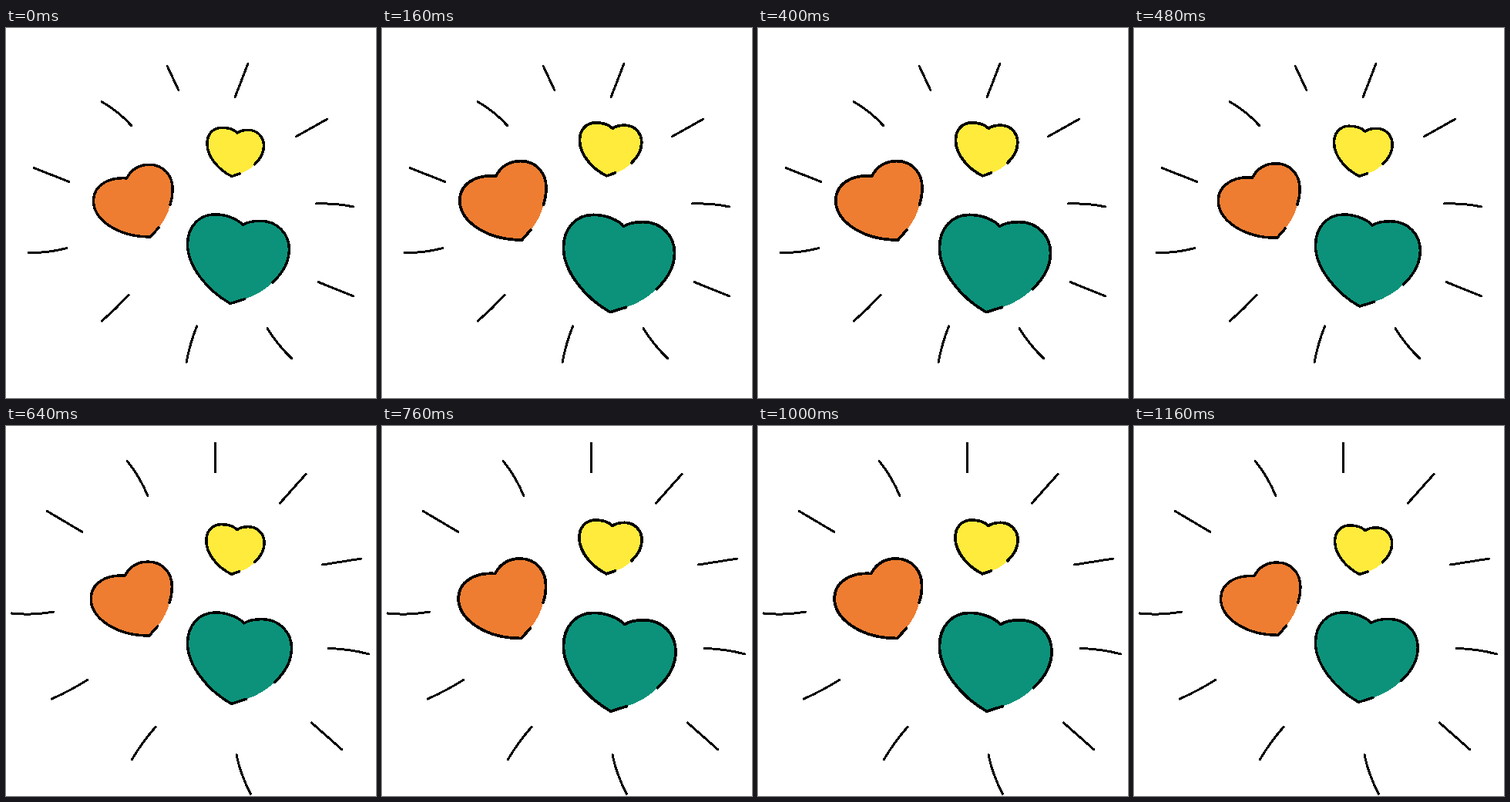
These frames come from a looping animation (480 px wide and 480 px high, 1.2 s). An HTML page:

```html
<!DOCTYPE html>
<html lang="en">
<head>
<meta charset="utf-8">
<title>Beating hearts</title>
<style>
  html, body { margin: 0; width: 100%; height: 100%; overflow: hidden; background: #fff; }
  svg { display: block; width: 100%; height: 100%; shape-rendering: crispEdges; }
  path { fill: none; stroke: #000; stroke-linecap: round; stroke-linejoin: round; }
  .rays { stroke-width: 3; }
  .line { stroke-width: 3.4; }
</style>
</head>
<body>
<svg id="stage" viewBox="0 0 480 480"></svg>
<script>
const STEP = 40, STEPS = 30;
const RAY_HOLD = 5;
const BEATS = [0, 7, 14, 22, 30]; // small, large, small, large, small
const GROWTH = 0.152;

// Each outline is open; "gap" closes the fill along the unstroked edge.
const HEARTS = [
  {
    color: '#ffeb3b', anchor: [309.5, 199],
    line: 'M303 189 L293 192.5 C275.5 184 261.3 167 261 151 C260.5 138 268.5 129.3 280 129.3 ' +
          'C288 129.3 296 132 300 136 C304 133.3 309 132.3 314 132.3 ' +
          'C326 132.3 334.5 141 334.5 153 C334.5 162 330 170 322.5 177',
    gap: 'C317 183 310 187 303 189'
  },
  {
    color: '#ee7d31', anchor: [251, 228],
    line: 'M198 259 L187.5 271 C169 271 149 266.5 134 256.5 C120 247 113 236 113.5 223 ' +
          'C114 205 132 193 156.5 195 C162 184.5 171 177.3 186 177.3 ' +
          'C204 177.3 216.2 191 216.2 209 C216.2 216 215 223 213 229',
    gap: 'C211 239 206 249 198 259'
  },
  {
    color: '#0c927a', anchor: [236, 236],
    line: 'M309.5 351.7 L291 357.5 C261 340.5 235.5 309 235.5 281 C235.5 257 251 241.8 271 241.8 ' +
          'C287 241.8 302 249 307 255.5 C314 251 321 250.3 330 250.3 ' +
          'C352 250.3 367.4 267 367.4 287 C367.4 303 360 317 346 330',
    gap: 'C336 340 322 348 309.5 351.7'
  }
];

const RAYS = [
  'M209 49L224 81 M314 46L297 90 M124 95.5Q146 108 163 127 M36 181.5L82 199.5 ' +
  'M417 118L376 141 M402 228Q427 227 451 232 M29 291.5Q55 292 79 285.5 ' +
  'M405 329.5L451 348 M159 346.5Q143 364 124.5 380 M247.5 387Q239 408 234 433.5 ' +
  'M339 389.5Q352 411 371 429',
  'M271.5 22V60 M157 45Q174 66 184 91 M389 62.5L355.5 100 M53.5 110.5L99 137.5 ' +
  'M410.5 180L461 172 M7.5 243Q33 246 62 241 M418 288.5Q445 289 471 296 ' +
  'M59.5 354Q84 343 105.5 329.5 M194 390.5Q176 411 163.5 432.5 ' +
  'M396.5 385L436 420 M299 426.5Q304 452 317.5 477.5'
];

const stage = document.getElementById('stage');

function add(parent, tag, attrs = {}) {
  const node = document.createElementNS('http://www.w3.org/2000/svg', tag);
  for (const key in attrs) node.setAttribute(key, attrs[key]);
  return parent.appendChild(node);
}

const rays = add(stage, 'path', { class: 'rays' });

for (const heart of HEARTS) {
  heart.group = add(stage, 'g');
  add(heart.group, 'path', { d: heart.line + heart.gap + 'Z', style: `fill:${heart.color};stroke:none` });
  add(heart.group, 'path', { d: heart.line, class: 'line' });
}

const smooth = p => p * p * (3 - 2 * p);

function beat(step) {
  const i = BEATS.findIndex((start, k) => step < BEATS[k + 1]);
  const p = smooth((step - BEATS[i]) / (BEATS[i + 1] - BEATS[i]));
  return i % 2 ? 1 - p : p;
}

function draw(ms) {
  const step = Math.floor(ms / STEP) % STEPS;
  const scale = 1 + GROWTH * beat(step);
  rays.setAttribute('d', RAYS[Math.floor(step / RAY_HOLD) % 2]);
  for (const { group, anchor: [x, y] } of HEARTS) {
    group.setAttribute('transform', `translate(${x} ${y}) scale(${scale}) translate(${-x} ${-y})`);
  }
}

const begin = performance.now();
function tick() {
  draw(performance.now() - begin);
  requestAnimationFrame(tick);
}
tick();
</script>
</body>
</html>
```
